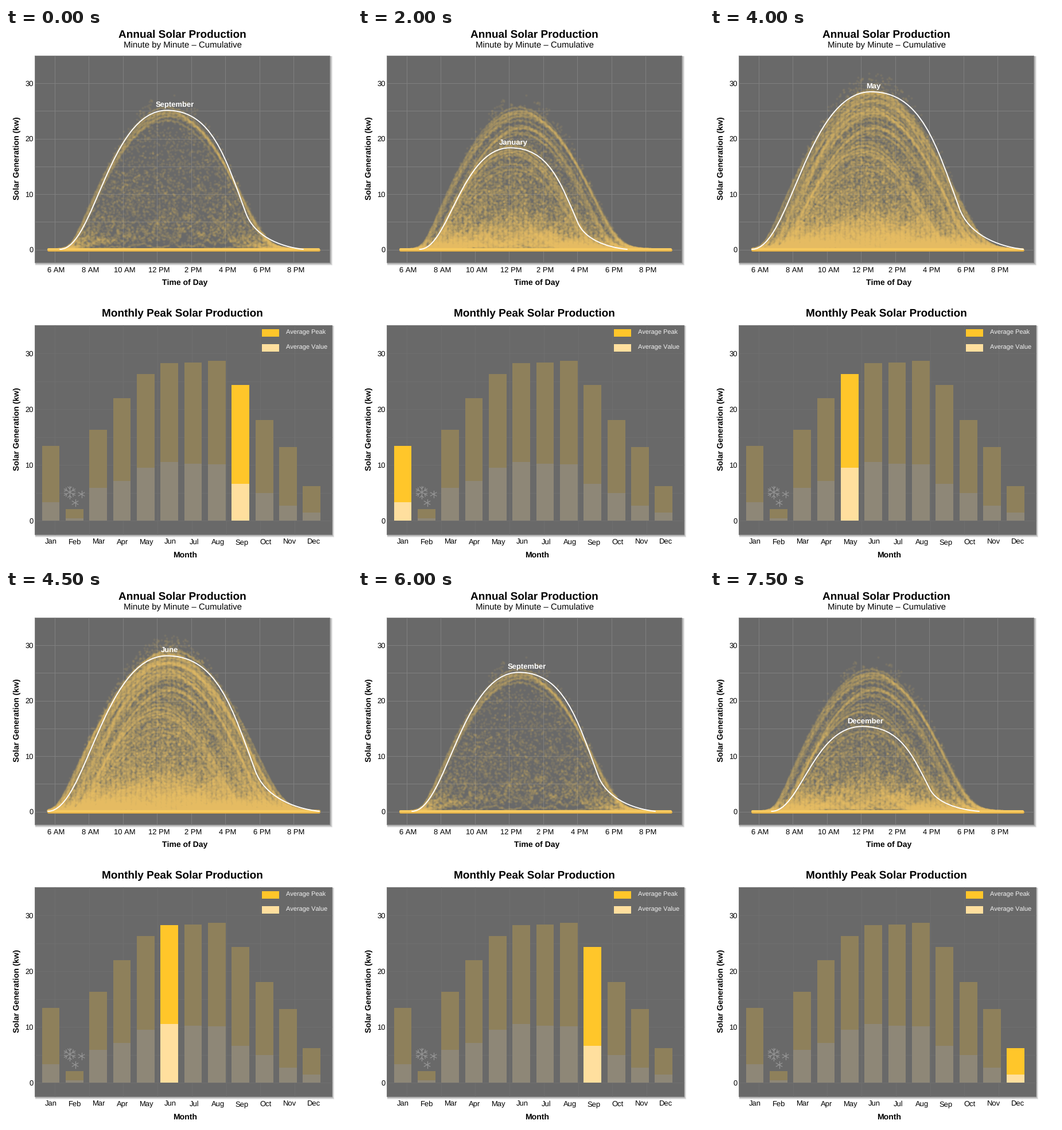
These frames come from a looping animation (603 px wide and 929 px high, 8 s). A matplotlib script:

```python
import numpy as np
import matplotlib.pyplot as plt
from matplotlib.animation import FuncAnimation
from matplotlib.patches import PathPatch, Rectangle
from matplotlib.path import Path

W, H, DPI = 603, 929, 64
PT = 72 / DPI  # points per pixel
MONTHS = ["January", "February", "March", "April", "May", "June", "July",
          "August", "September", "October", "November", "December"]
FIRST = 8  # accumulation starts in September
PEAK = [13.4, 2.1, 16.3, 22, 26.3, 28.2, 28.4, 28.7, 24.3, 18, 13.2, 6.2]
MEAN = [3.3, .4, 5.9, 7.1, 9.5, 10.5, 10.2, 10.1, 6.6, 4.9, 2.7, 1.4]
ZERO, KW = 385, 9.65        # upper chart: baseline and pixels per kw
BASE, BAR_KW = 857, 9.7     # lower chart
DIM, LIT = ("#8e805b", "#8e8777"), ("#ffc62a", "#ffdf9e")
GOLD, GRAY = "#f0c662", "#979797"

plt.rcParams.update({"font.family": "Liberation Sans", "text.hinting": "none",
                     "text.hinting_factor": 1})
fig = plt.figure(figsize=(W / DPI, H / DPI), dpi=DPI, facecolor="white")
ax = fig.add_axes([0, 0, 1, 1])
ax.set(xlim=(0, W), ylim=(H, 0))
ax.axis("off")


def text(x, y, s, size=13.1, ha="center", **kw):
    return ax.text(x, y, s, fontsize=size * PT, ha=ha, va="baseline", **kw)


def box(x0, y0, x1, y1, color, z=1, **kw):
    return ax.add_patch(Rectangle((x0, y0), x1 - x0, y1 - y0, fc=color,
                                  lw=0, zorder=z, **kw))


def line(xs, ys, color, width=1, z=2, **kw):
    return ax.plot(xs, ys, color=color, lw=width * PT, zorder=z, **kw)[0]


def panel(x0, y0, x1, y1, zero, step, x_step, edge, grid):
    for i in range(5):
        box(x0 + 1, y0 + 1, x1 + i + .5, y1 + i + .5, "black", 0, alpha=.09)
    box(x0, y0, x1, y1, "#696969")
    line([x0, x1, x1, x0, x0], [y0, y0, y1, y1, y0], edge)
    for i in range(8):
        line([85 + x_step * i] * 2, [y0, y1], grid)
    for i in range(7):
        y = zero - i * step
        line([x0, x1], [y, y], grid)
        if i % 2 == 0:
            text(47.5, y + 4.5, str(i * 5), ha="right")
    ax.text(19.5, (y0 + y1) / 2 - 1, "Solar Generation (kw)", rotation=90,
            fontsize=14.3 * PT, weight="bold", ha="center", va="center")


def season(m, keys):
    """Value for a month, interpolated around the year from key months."""
    return np.interp(m, list(keys), list(keys.values()), period=12)


def top_kw(m):
    return season(m, {0: 18.3, 1: 5.5, 2: 26.7, 4: 28.4, 7: 27.3, 9: 22.8,
                      11: 15.3})


def noon(m):
    return season(m, {1: 265, 2: 281, 9: 280, 10: 265})


# ---- upper chart -------------------------------------------------------
text(307, 17, "Annual Solar Production", 19.3, weight="bold")
text(307.5, 34, "Minute by Minute \u2013 Cumulative", 14.5)
text(311.5, 447, "Time of Day", 14.3, weight="bold")
panel(50, 47.5, 564, 408, ZERO + .5, 5 * KW, 59.45, "#8a8a8a", "#7f7f7f")
for i in range(8):
    hour = 6 + 2 * i
    text(87.5 + 59.7 * i, 425,
         f"{(hour - 1) % 12 + 1} {'AM' if hour < 12 else 'PM'}")

# Unit bell: x runs -1 (start), 0 (peak), 1 (end)
BELL = np.array([(-1, 0), (-.68, 0), (-.54, 1), (0, 1), (.33, 1), (.43, .66),
                 (.58, .26), (.64, .10), (.82, .02), (1, 0)])


def peak_curve(m):
    start = season(m, {2: 108, 4: 73, 7: 73, 8: 94, 9: 98, 10: 107})
    end = season(m, {1: 469, 2: 503, 4: 546, 7: 546, 8: 518, 9: 518, 10: 469})
    mid = noon(m)
    x, y = BELL.T
    x = mid + x * np.where(x < 0, mid - start, end - mid)
    codes = [Path.MOVETO] + [Path.CURVE4] * 9
    return Path(np.column_stack([x, ZERO - y * top_kw(m) * KW]), codes)


rng = np.random.default_rng(7)
N = 420
xs = np.linspace(73, 546, N)


def noise(width):
    return np.convolve(rng.normal(size=N), np.ones(width) / width**.5, "same")


def clear_sky(m):
    span = 160 + 30 * np.cos(2 * np.pi * (m - 5.3) / 12)
    u = (xs - noon(m) - 3 - rng.normal() * 2) / span
    c = np.cos(np.pi / 2 * np.clip(u, -1.8, 1.8))
    soft = np.where(u < 0, 16, 8)  # longer tail in the evening
    return (np.log1p(np.exp(soft * c)) / soft) ** .92 * top_kw(m) * KW


def day(m, kind):
    if kind == "clear":
        k = rng.uniform(.91, 1.05) + .004 * noise(3)
    elif kind == "mixed":
        k = .58 + .32 * noise(rng.integers(1, 7))
        k = 1.12 - np.abs(1.12 - np.abs(k))
    else:
        k = rng.uniform(.02, .24) * np.exp(.5 * noise(30) + .2 * noise(6))
        k = np.minimum(k, .6)
    return clear_sky(m) * k


def readings(m):
    sun = PEAK[m] / max(PEAK)
    clear, mixed = round(9 * sun), round(12 * sun)
    kinds = (["clear"] * clear + ["mixed"] * mixed
             + ["dull"] * (27 - clear - mixed))
    up = np.concatenate([day(m, kind) for kind in kinds])
    x = np.tile(xs, len(kinds))
    keep = up > .6
    return x[keep], ZERO - up[keep]


dots = [ax.plot(*readings((FIRST + k) % 12), "o", ms=4.2 * PT, mew=0,
                color=GOLD, alpha=.09, zorder=3, snap=False)[0]
        for k in range(12)]

line([74, 545], [385.6, 385.6], "#e0ae48", 5, 4, solid_capstyle="round")
line([74, 545], [385.2, 385.2], "#f6c95f", 4, 4, solid_capstyle="round")
curve = ax.add_patch(PathPatch(peak_curve(FIRST), fc="none", ec="white",
                               lw=1.9 * PT, capstyle="round", zorder=5))
name = text(0, 0, "", 13, weight="bold", color="white", zorder=6)

# ---- lower chart -------------------------------------------------------
text(307.5, 502, "Monthly Peak Solar Production", 19.3, weight="bold")
text(312.5, 921, "Month", 14.3, weight="bold")
panel(50, 516.5, 567.5, 881, BASE, 5 * BAR_KW, 59.7, "#7d7d7d", "#6f6f6f")

bars = []
for m in range(12):
    x = 62.5 + 41.36 * m
    peak, mean = BASE - PEAK[m] * BAR_KW, BASE - MEAN[m] * BAR_KW
    bars.append((box(x, peak, x + 30.8, mean, DIM[0], 3),
                 box(x, mean, x + 30.8, BASE, DIM[1], 3)))
    text(78.5 + 41.6 * m, 898, MONTHS[m][:3])

for y, color, s in zip((524, 550), LIT, ("Average Peak", "Average Value")):
    box(446, y, 476, y + 13, color, 3)
    text(488, y + 9, s, 11.2, ha="left", color="#f2f2f2")


def ray(x, y, r, angle):
    end = x + r * np.cos(angle), y + r * np.sin(angle)
    return line([x, end[0]], [y, end[1]], GRAY, 1.2, 4)


def flake(x, y, r, barbs=False):
    rays = []
    for a in np.arange(6) * np.pi / 3 + np.pi / 2:
        rays.append(ray(x, y, r, a))
        if barbs:
            bx, by = x + .55 * r * np.cos(a), y + .55 * r * np.sin(a)
            rays += [ray(bx, by, .4 * r, a + turn) for turn in (-.8, .8)]
    return rays


snow = flake(111, 807.5, 11, True) + flake(131.5, 811, 6) + flake(120.5, 826, 6)


def update(i):
    k = i % 12
    m = (FIRST + k) % 12
    for j, d in enumerate(dots):
        d.set_visible(j <= k)
    curve.set_path(peak_curve(m))
    name.set_text(MONTHS[m])
    name.set_position((season(m, {1: 271, 2: 284, 7: 285, 8: 294, 9: 292,
                                  10: 271}), ZERO - top_kw(m) * KW - 5.5))
    for j, pair in enumerate(bars):
        for patch, color in zip(pair, LIT if j == m else DIM):
            patch.set_facecolor(color)
    for r in snow:
        r.set_color("white" if m == 1 else GRAY)
    return []


anim = FuncAnimation(fig, update, frames=16, interval=500, repeat=True,
                     repeat_delay=0, blit=False)
plt.show()
```
